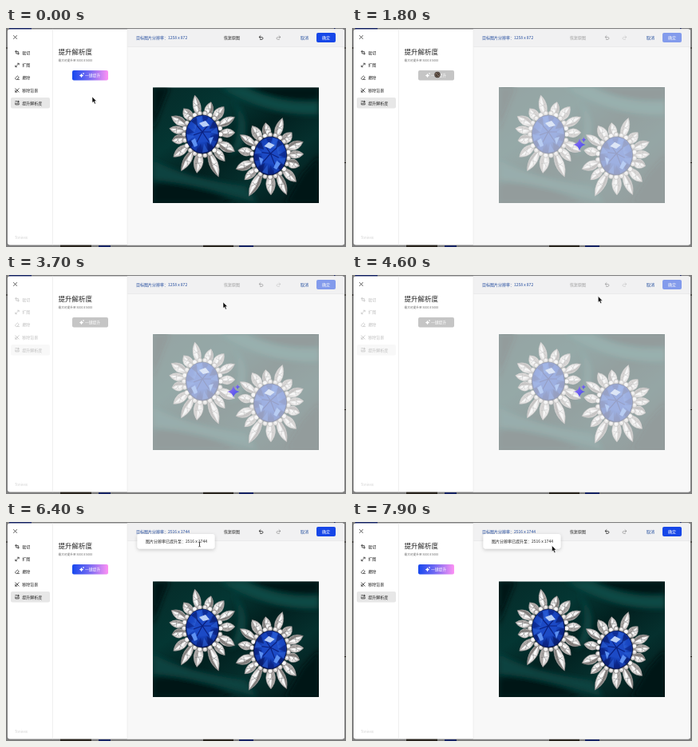
Animation, 426 px wide and 274 px high, one loop 8 s. Source, as an HTML page:

```html
<!DOCTYPE html>
<html lang="zh-CN">
<head>
<meta charset="utf-8">
<style>
html, body { margin: 0; width: 100%; height: 100%; overflow: hidden; background: #7f7f7f; }
svg { display: block; width: 100vw; height: 100vh; }
text { font: 5px "Noto Sans CJK SC", "Noto Sans CJK", "Noto Sans", sans-serif; fill: #222; }
.line { fill: none; stroke: #333; stroke-width: .8; stroke-linecap: round; stroke-linejoin: round; }
</style>
</head>
<body>
<svg viewBox="0 0 426 274" preserveAspectRatio="none">
<defs>
  <linearGradient id="cta"><stop stop-color="#1748ee"/><stop offset=".45" stop-color="#7069f2"/><stop offset="1" stop-color="#ff92f4"/></linearGradient>
  <linearGradient id="glow" x2="1" y2="1"><stop stop-color="#9a72f5"/><stop offset="1" stop-color="#3c4ce6"/></linearGradient>
  <linearGradient id="cloth" x2="1" y2="1">
    <stop stop-color="#052a28"/><stop offset=".3" stop-color="#043633"/><stop offset=".5" stop-color="#02201f"/>
    <stop offset=".7" stop-color="#05302e"/><stop offset="1" stop-color="#021415"/>
  </linearGradient>
  <radialGradient id="blue" cx=".45" cy=".4" r=".65"><stop stop-color="#3f78e8"/><stop offset=".5" stop-color="#1643bd"/><stop offset="1" stop-color="#071660"/></radialGradient>
  <linearGradient id="facet"><stop stop-color="#8b8787"/><stop offset=".5" stop-color="#e9e7e6"/><stop offset="1" stop-color="#c3bfbe"/></linearGradient>
  <filter id="soft" x="-20%" y="-20%" width="140%" height="140%"><feGaussianBlur stdDeviation="3"/></filter>
  <filter id="shade" x="-20%" y="-50%" width="140%" height="220%"><feDropShadow dx="0" dy="1.5" stdDeviation="2" flood-opacity=".2"/></filter>
  <clipPath id="frame"><path d="M184 74.5H392V219H184Z"/></clipPath>
  <path id="star" d="M0-8Q1.2-1.2 8 0Q1.2 1.2 0 8Q-1.2 1.2-8 0Q-1.2-1.2 0-8Z"/>
  <g id="earring"></g>
</defs>

<path fill="#7f7f7f" d="M0 0H426V274H0Z"/>
<path fill="#172463" d="M4 0H32V3H4Z M411 0h1.500v3h-1.500Z M116 272h15v2h-15Z M292 272h18v2h-18Z"/>
<path fill="#29251f" d="M68 271h39v3h-39Z M247 271h38v3h-38Z M0 24.500h2v1H0Z M424 24.500h2v1h-2Z M424 168h2v1h-2Z"/>
<rect x="2" y="1.500" width="422" height="270" rx="3" fill="#fff"/>
<path fill="#f8f8f8" d="M152 1.500H421Q424 1.500 424 4.500V268.500Q424 271.500 421 271.500H152Z"/>
<path fill="#f1f1f2" d="M152 1.500H421Q424 1.500 424 4.500V23.500H152Z"/>
<path stroke="#e9e9e9" stroke-width=".7" d="M58.500 1.500V271.500M152 1.500V271.500M152 23.500H424"/>
<path class="line" d="M9.500 9.500l4 4m0-4l-4 4"/>
<text x="11" y="264" style="font-size:4.500px;fill:#d2d2d2">Tonivex</text>

<g id="menu"></g>

<text x="65.500" y="32.500" style="font-size:8.500px;font-weight:500">提升解析度</text>
<text x="65.500" y="41.500" style="font-size:3.700px;fill:#666">最大可提升至 5000 x 5000</text>
<rect id="button" x="83" y="53" width="45" height="12.500" rx="2"/>
<g fill="#fff"><use href="#star" transform="translate(94.500 59.500)scale(.34)"/><use href="#star" transform="translate(97 57)scale(.15)"/></g>
<text x="99" y="61.200" style="font-size:4.800px;font-weight:500;fill:#fff">一键提升</text>

<text id="size" x="163" y="13.800" style="fill:#234c9e"></text>
<g id="tools">
  <text x="273" y="13.800">恢复原图</text>
  <path class="line" d="M319 9.700l-2 1.700 2 1.700M317.300 11.400h2.700q2 0 2 1.500t-2 1.500h-1.500"/>
  <path class="line" opacity=".4" d="M342 9.700l2 1.700-2 1.700M343.700 11.400h-2.700q-2 0-2 1.500t2 1.500h1.500"/>
</g>
<text x="369" y="13.800" style="fill:#1f4b9d">取消</text>
<g id="confirm">
  <rect x="389" y="6" width="24" height="12" rx="2" fill="#1747e8"/>
  <text x="396" y="13.800" style="fill:#fff;font-weight:500">确定</text>
</g>

<g clip-path="url(#frame)">
  <path fill="url(#cloth)" d="M184 74H392V219H184Z"/>
  <g filter="url(#soft)">
    <path fill="#0c4a45" d="M268 74H300Q340 95 392 92V108Q330 112 268 74Z"/>
    <path fill="#011314" d="M184 74H205Q190 110 184 130Z M300 74H392V88Q345 94 300 74Z M184 195Q235 190 290 219H184Z M372 182L392 160V219H350Z"/>
    <path fill="#0a433f" d="M184 165Q225 188 300 198L315 219Q240 195 184 190Z M284 90Q300 115 280 160L295 150Q310 115 284 90Z"/>
  </g>
  <use href="#earring" transform="translate(246 133)"/>
  <use href="#earring" transform="translate(331 160)rotate(7)scale(-1 1)"/>
  <path id="veil" fill="#f6f6f6" d="M184 74H392V219H184Z"/>
</g>
<g id="spark" fill="url(#glow)"><use href="#star"/><use href="#star" transform="translate(5.500 -6.500)scale(.42)"/></g>

<g id="toast">
  <rect x="164.500" y="15" width="97" height="18.500" rx="3" fill="#fff" filter="url(#shade)"/>
  <text x="175" y="25.800">图片分辨率已提升至：2516 x 1744</text>
</g>

<g id="cursor">
  <path id="arrow" fill="#111" stroke="#fff" stroke-width=".5" d="M0 0V7.600L1.700 6.100 3 9 4.400 8.400 3.200 5.600H5.500Z"/>
  <path id="hand" fill="#111" stroke="#fff" stroke-width=".5" d="M-.8 0Q0-1 .8 0V3L3.500 3.700Q4.300 4 4 5.300L3.200 8.500H-1L-3 5.500Q-3 4.300-1.800 4.800L-.8 5.600Z"/>
  <g id="wait"><circle r="3.700" fill="#3d3530"/><path d="M-2-2L2 2" stroke="#a38c7b" stroke-width="1"/><circle r="2.600" fill="none" stroke="#8a7565" stroke-width=".7"/></g>
  <path id="beam" fill="none" stroke="#333" stroke-width=".7" d="M-1.300-3Q0-3 0-2V2Q0 3-1.300 3M1.300-3Q0-3 0-2V2Q0 3 1.300 3"/>
</g>
</svg>

<script>
const $ = id => document.getElementById(id);
const show = (id, opacity) => $(id).setAttribute('opacity', opacity);
const clamp = v => Math.max(0, Math.min(1, v));
const ease = v => v * v * (3 - 2 * v);

// Menu: label and icon path, drawn around the icon centre
const items = [
  ['裁切', 'M-1.300-2.500V1.300H2.500M-2.500-1.300H1.300V2.500'],
  ['扩图', 'M.5-2.200H2.200V-.5M-.5 2.200H-2.200V.5M2-2L-2 2'],
  ['擦除', 'M-2.300.4L.4-2.200 2.300-.3-.3 2.200H-1ZM.5 2.200H2.500'],
  ['移除背景', 'M-2.200-2.200L2.200 2.200M2.200-2.200L-2.200 2.200M-2.200 0V2.200H0'],
  ['提升解析度', 'M-2.200 0V2.200H2.200V.5M-2.200-2H0M1.500-2.500V-.5M.5-1.500H2.500M-1 1L0 0 1 1']
];
$('menu').innerHTML = '<rect x="6" y="87" width="49" height="13.500" rx="2" fill="#e7e7e7"/>' +
  items.map(([label, icon], i) => {
    const y = 30.7 + i * 15.75;
    return `<path class="line" stroke-width=".7" transform="translate(14 ${y})" d="${icon}"/><text x="20.300" y="${y + 1.8}">${label}</text>`;
  }).join('');

// Earring: petals as [angle, reach], a ring of round stones, a faceted oval gem
const petals = [[-101, 50], [-75, 42], [-52, 44], [-28, 46], [-3, 41], [28, 46], [50, 44], [69, 57],
  [98, 49], [120, 53], [142, 46], [168, 39], [-170, 42], [-150, 45], [-126, 40]];
const petal = ([angle, r], i) => {
  const m = (r + 22) / 2, w = 10 + i % 3;
  return `<g transform="rotate(${angle})">
    <path d="M20 0Q${m}${-w} ${r} 0Q${m} ${w} 20 0Z" fill="url(#facet)" stroke="#6d6a6a" stroke-width=".5"/>
    <path d="M22 0Q${m} ${w * .9} ${r} 0L${m + 3} ${1 + i % 2}Z" fill="${i % 2 ? '#85817f' : '#aaa6a4'}"/>
    <path d="M24 0L${m}-3L${r - 2} 0L${m + 2} 1Z" fill="#fafafa"/>
    <path d="M${m}-4L${m + 2} 4M${m - 4} 3L${m + 5}-3" stroke="#777" stroke-width=".5"/></g>`;
};
const stones = Array.from({length: 22}, (_, i) => {
  const a = i * Math.PI / 11, x = 23 * Math.cos(a), y = 26.5 * Math.sin(a);
  return `<circle cx="${x}" cy="${y}" r="3" fill="${i % 3 ? '#d9d6d4' : '#f4f3f2'}" stroke="#686565" stroke-width=".6"/><circle cx="${x}" cy="${y - .5}" r="1" fill="#fff"/>`;
}).join('');
const rim = (i, k) => {
  const a = i * Math.PI / 8;
  return `${20 * k * Math.cos(a)} ${23.5 * k * Math.sin(a)}`;
};
const cuts = Array.from({length: 16}, (_, i) =>
  `<path d="M${rim(i, .98)}L${rim(i + 1, .98)}L${rim(i + .5, .5)}Z" fill="${['#0a2384', '#2b62da', '#081b6b', '#1947c4'][i * 3 % 4]}" opacity=".65"/>`).join('');
$('earring').innerHTML = petals.map(petal).join('') + stones +
  `<ellipse rx="20.500" ry="24" fill="url(#blue)" stroke="#071347" stroke-width=".7"/>${cuts}
  <path d="M-7-11H7L11-3 8 9-7 10-11 1Z" fill="#1c4ac5"/>
  <path d="M-7-11L0-3 7-11M-11 1L0-3 11-3M-7 10L0-3 8 9" fill="none" stroke="#0a2180" stroke-width="1.200"/>
  <path d="M-4-14L4-17 9-11 1-9Z" fill="#b9d0f8"/>
  <path d="M-14 8L-9 5-6 14-10 16Z M8 5L14 3 10 13Z" fill="#5d91f2"/>`;

// Pointer: time, x, y, shape held from that time on
const track = [
  [0, 108, 86, 'arrow'], [500, 108, 86, 'arrow'], [1000, 106.5, 66, 'hand'], [1200, 106.5, 60, 'hand'],
  [1800, 107, 58.5, 'wait'], [2750, 107, 58.5, 'wait'], [2900, 130, 55, 'arrow'], [3500, 272, 34, 'arrow'],
  [4000, 272, 34, 'arrow'], [4900, 321, 24, 'arrow'], [5300, 321, 24, 'arrow'], [5950, 250, 28, 'beam'],
  [6200, 242.5, 28, 'beam'], [6800, 242.5, 28, 'beam'], [7200, 250.5, 29.5, 'arrow'], [8000, 250.5, 29.5, 'arrow']
];
const START = 1800, END = 4950;

function draw(now) {
  const t = now % 8000, busy = t >= START && t < END;
  const fade = t < END ? clamp((t - START) / 250) : 1 - clamp((t - END) / 350);
  show('menu', 1 - .72 * fade);
  show('tools', busy ? .4 : 1);
  show('confirm', busy ? .5 : 1);
  show('veil', busy ? .6 : 0);
  $('button').setAttribute('fill', busy ? '#c5c5c5' : 'url(#cta)');
  $('size').textContent = '目标图片分辨率：' + (t < END ? '1258 x 872' : '2516 x 1744');

  show('spark', busy ? 1 : 0);
  const pulse = .97 + .06 * Math.sin((t - START) * Math.PI / 500);
  $('spark').setAttribute('transform', `translate(285 146)scale(${pulse})`);

  const drop = ease(clamp((t - 5200) / 250));
  show('toast', drop);
  $('toast').setAttribute('transform', `translate(0 ${8 * drop - 8})`);

  const i = track.findIndex(k => k[0] > t) - 1;
  const [t0, x0, y0, shape] = track[i], [t1, x1, y1] = track[i + 1];
  const p = ease((t - t0) / (t1 - t0));
  $('cursor').setAttribute('transform', `translate(${x0 + (x1 - x0) * p} ${y0 + (y1 - y0) * p})`);
  for (const id of ['arrow', 'hand', 'wait', 'beam']) show(id, id === shape ? 1 : 0);
}

const begin = performance.now();
function tick() {
  draw(performance.now() - begin);
  requestAnimationFrame(tick);
}
tick();
</script>
</body>
</html>
```
